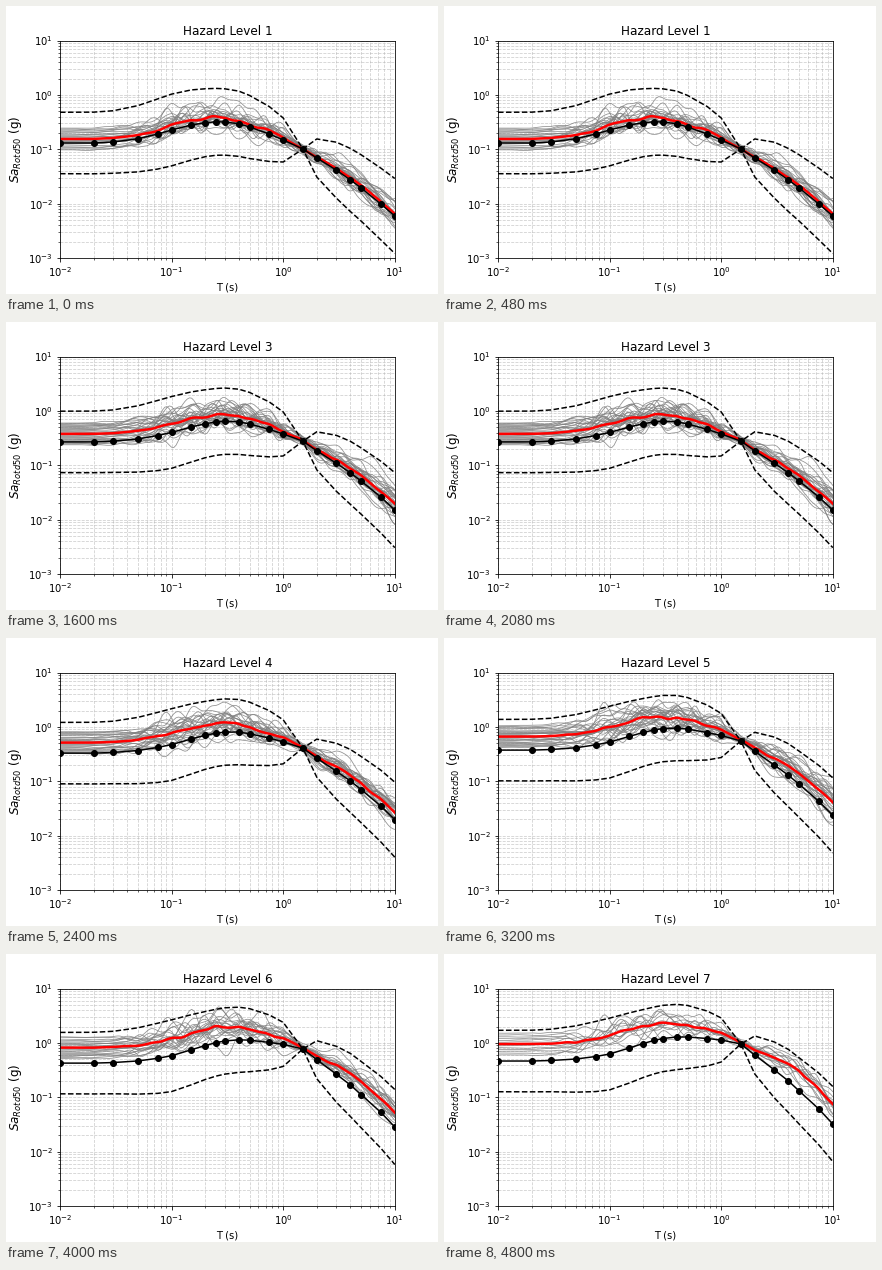
Animation of 432 by 288 pixels, one loop 5600 ms. Source, as a matplotlib script:

```python
import numpy as np
import matplotlib.pyplot as plt
from matplotlib.animation import FuncAnimation

LEVELS = 7
PX = 54.36  # pixels per vertical decade

periods = np.array([0.01, 0.02, 0.03, 0.05, 0.075, 0.1, 0.15, 0.2, 0.25, 0.3, 0.4,
                    0.5, 0.75, 1, 1.5, 2, 3, 4, 5, 7.5, 10])
log_p = np.log10(periods)

# log10 spectra of the weakest and the strongest level, and the two-sigma half width
low = np.array([-.884, -.884, -.866, -.806, -.719, -.645, -.553, -.512, -.495, -.498, -.530,
                -.590, -.719, -.829, -.995, -1.160, -1.385, -1.565, -1.712, -2.007, -2.227])
high = np.array([-.333, -.333, -.323, -.296, -.250, -.204, -.093, -.011, .045, .081, .109,
                 .109, .081, .054, -.020, -.222, -.498, -.700, -.884, -1.216, -1.492])
half = np.array([.565, .567, .575, .61, .645, .66, .645, .625, .615, .61, .60,
                 .58, .505, .405, 0, .35, .515, .58, .61, .66, .69])

# progress from low to high, and its lag around the conditioning period of 1.5 s
progress = [0, .30, .57, .73, .83, .93, 1]
lag = [0, .07, .12, .11, .075, .024, 0]
lag_shape = np.exp(-(log_p - log_p[14]) ** 2 / 0.412)

# height of the record mean above the median, in pixels
short_gap = [4, 5.5, 8, 10.5, 13.5, 15.5, 17]
long_gap = [2.5, 5, 6, 7, 12, 14, 21]
counts = [24, 30, 30, 28, 28, 22, 13]

x = np.linspace(-2, 1, 151)
T = 10 ** x


def shape(points, values):
    return np.interp(x, np.log10(points), values)


short_shape = shape([.01, .05, .1, .2, .3, .5, 1, 1.5, 2], [1, 1, 1.1, 1.05, .9, .7, .4, .05, 0])
long_shape = shape([1.5, 2, 3, 5, 10], [0, .25, .6, .9, 1])
level_env = shape([.01, .05, .3, 1.5], [1, 1, .6, .1])
fine_env = shape([.01, .03, .06, .12, .5, 1, 1.5, 2, 4, 10],
                 [0, .01, .05, .1, .1, .07, .025, .05, .07, .06])
broad_env = shape([.01, .04, .1, .4, 1, 1.5, 2.2, 4, 10],
                  [0, .01, .07, .09, .06, .025, .07, .11, .15])
bump = 0.42 * np.exp(-((x + 1.05) / 0.08) ** 2)


def smooth_noise(rng, width):
    k = np.arange(-30, 31)
    kernel = np.exp(-k ** 2 / (2 * width ** 2))
    kernel /= np.sqrt((kernel ** 2).sum())
    return np.convolve(rng.normal(size=x.size + 60), kernel, "valid")


def median_curve(i):
    return low + (progress[i] - lag[i] * lag_shape) * (high - low)


def mean_curve(i):
    rng = np.random.default_rng(40 + i)
    gap = (short_gap[i] * short_shape + long_gap[i] * long_shape) / PX
    return np.interp(x, log_p, median_curve(i)) + gap + 0.15 * fine_env * smooth_noise(rng, 2)


def records(i, mean):
    rng = np.random.default_rng(100 + i)
    n = counts[i]
    offsets = rng.permutation(np.linspace(-0.2, 0.2, n))
    dev = np.array([o * level_env + fine_env * smooth_noise(rng, 2.2)
                    + broad_env * smooth_noise(rng, 9) for o in offsets])
    dev -= dev.mean(axis=0)
    dev[0] = 0.4 * dev[0] + bump
    return mean + dev


fig, ax = plt.subplots(figsize=(6, 4), dpi=72)
fig.subplots_adjust(left=0.125, right=0.9, bottom=0.125, top=0.88)
ax.set(xscale="log", yscale="log", xlim=(0.01, 10), ylim=(1e-3, 10))
ax.grid(True, which="both", linestyle="--", alpha=0.6)
ax.set_xlabel("T (s)")
ax.set_ylabel("$Sa_{Rotd50}$ (g)", fontsize=12)

grey = [ax.plot([], [], color="gray", lw=0.8, alpha=0.85)[0] for _ in range(max(counts))]
red, = ax.plot([], [], color="red", lw=2.5)
black, = ax.plot([], [], "k-o", lw=1.5)
upper, = ax.plot([], [], "k--", lw=1.5)
lower, = ax.plot([], [], "k--", lw=1.5)


def draw(i):
    mid, mean = median_curve(i), mean_curve(i)
    curves = records(i, mean)
    for j, line in enumerate(grey):
        line.set_data(*((T, 10 ** curves[j]) if j < len(curves) else ([], [])))
    red.set_data(T, 10 ** mean)
    black.set_data(periods, 10 ** mid)
    upper.set_data(periods, 10 ** (mid + half))
    lower.set_data(periods, 10 ** (mid - half))
    ax.set_title(f"Hazard Level {i + 1}", fontsize=12)
    return [*grey, red, black, upper, lower]


anim = FuncAnimation(fig, draw, frames=LEVELS, interval=800, repeat=True, blit=False)
plt.show()
```
